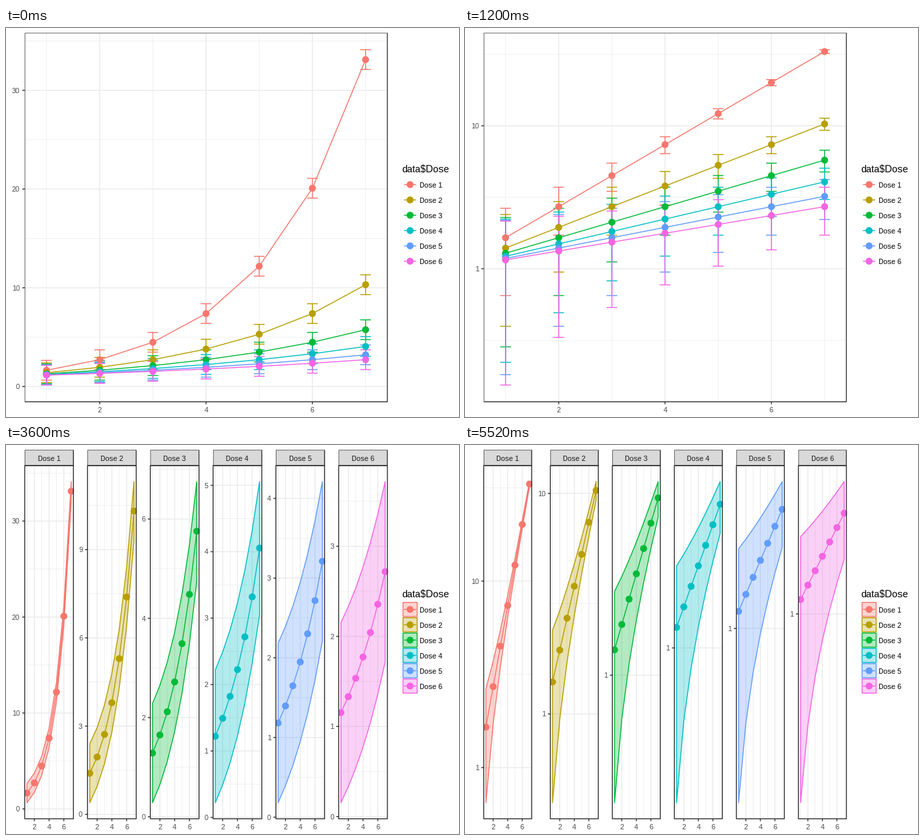
Recreate the animation shown at these times as a matplotlib script. Size 680 by 585 pixels, loop 6 s.

```python
import numpy as np
import matplotlib.pyplot as plt
from matplotlib.animation import FuncAnimation
from matplotlib.colors import to_rgba
from matplotlib.patches import Circle, PathPatch
from matplotlib.path import Path

W, H, DPI = 680, 585, 80
PT = 72 / DPI  # points per pixel

plt.rcParams.update({
    "font.family": "Liberation Sans",
    "text.hinting": "default",
    "text.hinting_factor": 1,
    "path.snap": False,
    "toolbar": "None",
})

COLORS = ["#F8766D", "#B79F00", "#00BA38", "#00BFC4", "#619CFF", "#F564E3"]
DARK, GRID, STRIP = "#333333", "#EBEBEB", "#D9D9D9"
LINE, THIN = 1.42, 0.71
TOP, BOTTOM, LEFT, RIGHT = 7.4, 562.1, 28.1, 572.5
STRIP_H = 23.5
STEPS = [10, 3, 2, 1, 1, 1]  # linear axis step for each dose

X = np.arange(1, 8)
MEANS = [np.exp(X / (d + 2)) for d in range(6)]

fig = plt.figure(figsize=(W / DPI, H / DPI), dpi=DPI, facecolor="white")
ax = fig.add_axes([0, 0, 1, 1])


def add(patch, clip=None):
    ax.add_patch(patch)
    if clip is None:
        patch.set_clip_on(False)
    else:
        # the device clips one pixel wider on the right and the bottom
        x0, y0, x1, y1 = clip
        x1, y1 = x1 + 1, y1 + 1
        area = Path([(x0, y0), (x1, y0), (x1, y1), (x0, y1), (x0, y0)])
        patch.set_clip_path(area, ax.transData)


def stroke(xs, ys, color, width=LINE, fill="none", clip=None, closed=False):
    pts = list(zip(xs, ys))
    if closed:
        pts.append(pts[0])
    add(PathPatch(Path(pts, closed=closed), ec=color, fc=fill, lw=width * PT,
                  capstyle="butt", joinstyle="round"), clip)


def box(x0, y0, x1, y1, color, fill="none", clip=None):
    stroke([x0, x1, x1, x0], [y0, y0, y1, y1], color, LINE, fill, clip, True)


def dot(x, y, color, clip=None):
    add(Circle((x, y), 5.2, fc=color, ec="none", lw=0), clip)


def label(x, y, text, color="#4D4D4D", size=11, ha="center"):
    ax.text(x, y, text, color=color, fontsize=size * PT, ha=ha, va="baseline")


def expand(lo, hi):
    pad = 0.05 * (hi - lo)
    return lo - pad, hi + pad


def y_breaks(lo, hi, log, step):
    """Labelled and minor break positions in scale units."""
    grid = np.arange(-1, 12) * (1 if log else step)
    major = [v for v in grid if lo < v < hi]
    if log and len(major) < 2:
        return major, []
    half = (grid[1] - grid[0]) / 2
    return major, [v + half for v in grid if lo < v + half < hi]


def panel(x0, y0, x1, y1, doses, log, ribbon, facet):
    clip = (x0, y0, x1, y1)
    scale = np.log10 if log else np.asarray
    pad = 0 if ribbon else 0.1
    xlo, xhi = expand(1 - pad, 7 + pad)
    ylo, yhi = expand(scale(min(MEANS[d][0] for d in doses) - 1 + 0.0),
                      scale(max(MEANS[d][-1] for d in doses) + 1))

    def px(x):
        return x0 + (x - xlo) / (xhi - xlo) * (x1 - x0)

    def raw(v):
        return y1 - (v - ylo) / (yhi - ylo) * (y1 - y0)

    def py(y):
        return raw(scale(y))

    major, minor = y_breaks(ylo, yhi, log, STEPS[doses[0]])
    for ys, xs, width in ((minor, (1, 3, 5, 7), THIN), (major, (2, 4, 6), LINE)):
        for v in ys:
            stroke([x0, x1], [raw(v)] * 2, GRID, width, clip=clip)
        for x in xs:
            stroke([px(x)] * 2, [y0, y1], GRID, width, clip=clip)

    for d in doses:
        m, c = MEANS[d], COLORS[d]
        low, high = py(m - 1), py(m + 1)
        if ribbon:
            stroke(np.r_[px(X), px(X)[::-1]], np.r_[high, low[::-1]], c,
                   fill=to_rgba(c, 0.3), clip=clip, closed=True)
            continue
        for x, a, b in zip(X, low, high):
            l, mid, r = px(x - 0.1), px(x), px(x + 0.1)
            for xs, ys in (([l, r], [b, b]), ([mid, mid], [a, b]), ([l, r], [a, a])):
                stroke(xs, ys, c, clip=clip)
    for d in doses:
        stroke(px(X), py(MEANS[d]), COLORS[d], clip=clip)
    for d in doses:
        for x, y in zip(px(X), py(MEANS[d])):
            dot(x, y, COLORS[d], clip)

    if facet:
        top = (x0, y0 - STRIP_H, x1, y0)
        box(*top, DARK, STRIP, top)
        label((x0 + x1) / 2, y0 - 7, f"Dose {doses[0] + 1}", "#1A1A1A")
    box(*clip, DARK, clip=None if facet else clip)

    for v in major:
        stroke([x0 - 3.67, x0], [raw(v)] * 2, DARK)
        label(x0 - 7.3, raw(v) + 4, f"{10 ** int(v) if log else v}", ha="right")
    for x in (2, 4, 6):
        stroke([px(x)] * 2, [y1, y1 + 3.67], DARK)
        label(px(x), y1 + 16, str(x))


def legend(y, ribbon):
    x = 606.6
    label(594.5, y - 18, "data$Dose", "black", 14.6, "left")
    for d, c in enumerate(COLORS):
        cy = y + 23.04 * d
        if ribbon:
            box(x - 10.6, cy - 10.6, x + 10.6, cy + 10.6, c, to_rgba(c, 0.3))
        stroke([x - 9.2, x + 9.2], [cy, cy], c)
        dot(x, cy, c)
        label(621, cy + 4.5, f"Dose {d + 1}", "black", ha="left")


def overlay(log):
    panel(LEFT, TOP, RIGHT, BOTTOM, range(6), log, False, False)
    legend(235.5, False)


def grid_view():
    width, pitch = 258.2, 192.6
    for d in range(6):
        x0 = LEFT if d % 2 == 0 else RIGHT - width
        y0 = TOP + STRIP_H + pitch * (d // 2)
        panel(x0, y0, x0 + width, y0 + 146.1, [d], True, False, True)
    legend(247.3, False)


def row_view(log):
    # the second log panel needs room for a two-digit label
    width, pitch = (72, 93.1) if log else (73.1, 94.26)
    for d in range(6):
        x0 = LEFT if d == 0 else RIGHT - width - pitch * (5 - d)
        panel(x0, TOP + STRIP_H, x0 + width, BOTTOM, [d], log, True, True)
    legend(247.3, True)


VIEWS = [
    lambda: overlay(False),
    lambda: overlay(True),
    grid_view,
    lambda: row_view(False),
    lambda: row_view(True),
]


def draw(i):
    ax.clear()
    ax.set(xlim=(0, W), ylim=(H, 0))
    ax.axis("off")
    VIEWS[i]()
    return []


anim = FuncAnimation(fig, draw, frames=len(VIEWS), interval=1200,
                     repeat=True, repeat_delay=0, blit=False)
plt.show()
```
